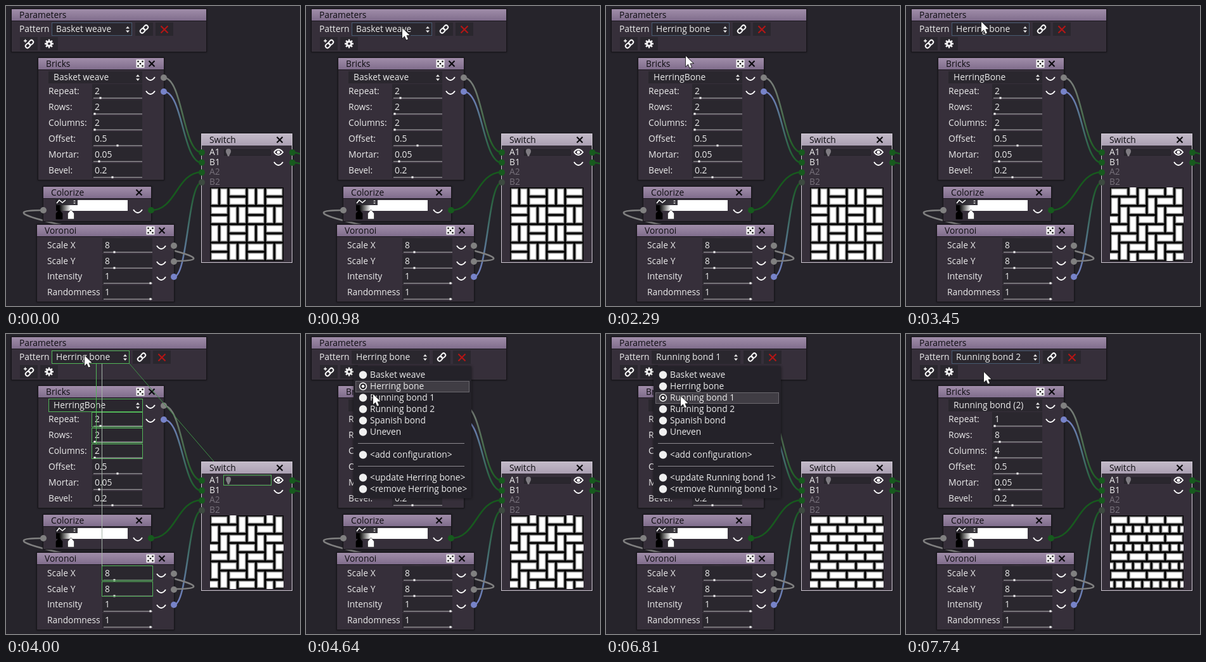
An HTML page with a canvas for the animation above (8 s loop, 464 by 473 pixels).

```html
<!DOCTYPE html>
<html lang="en">
<head>
<meta charset="utf-8">
<title>Node graph parameters</title>
<style>
html, body { margin: 0; width: 100%; height: 100%; overflow: hidden; background: #26242b; }
canvas { display: block; }
</style>
</head>
<body>
<canvas id="stage" width="464" height="473"></canvas>
<script>
const ctx = document.getElementById('stage').getContext('2d');
const LOOP = 8000;
const GREY = '#808080', BLUE = '#7783c9', GREEN = '#175a1e';
const WHITE = '#ececec', FIELD = '#2a272e', LINK = '#52b558';

const presets = [
  { name: 'Basket weave', mode: 'Basket weave', values: [2, 2, 2], grabs: [149, 140, 140], combo: 199, menu: 265 },
  { name: 'Herring bone', mode: 'HerringBone', values: [2, 2, 2], grabs: [149, 140, 140], combo: 195, menu: 261 },
  { name: 'Running bond 1', mode: 'Running bond', values: [1, 8, 4], grabs: [140, 148, 142], combo: 212, menu: 276 },
  { name: 'Running bond 2', mode: 'Running bond (2)', values: [1, 8, 4], grabs: [140, 148, 142], combo: 211, menu: 276 }
];
const menuNames = presets.map(p => p.name).concat('Spanish bond', 'Uneven');

// Pointer moves: first step, last step, step count, end point
const moves = [
  [380, 750, 6, 153, 37], [920, 1150, 4, 149, 28], [1290, 1460, 3, 142, 37],
  [1750, 1750, 1, 137, 57], [1830, 1980, 3, 126, 79], [3060, 3450, 6, 119, 25],
  [3680, 3680, 1, 118, 22], [3760, 3990, 4, 124, 34], [4070, 4470, 6, 110, 66],
  [4560, 4560, 1, 108, 84], [4640, 4640, 1, 106, 95], [4710, 4800, 2, 110, 101],
  [4950, 5340, 6, 131, 32], [6350, 6430, 2, 133, 19], [6500, 6500, 1, 130, 34],
  [6580, 6730, 3, 120, 92], [6810, 6810, 1, 118, 98], [6900, 6970, 2, 119, 116],
  [7350, 7740, 6, 123, 60]
];
const menuTimes = [[1290, 2210], [4150, 4880], [6580, 7280]];
const chosenAt = [2210, 4880, 7280], previewAt = [2670, 5030, 7510];

const countPassed = (times, t) => times.filter(s => t >= s).length;

function pointer(t) {
  let x = 376, y = 524;
  for (const [from, to, n, ex, ey] of moves) {
    if (t < from) break;
    const step = to > from ? Math.floor((t - from) / (to - from) * (n - 1) + 0.001) + 1 : n;
    const k = Math.min(step, n) / n;
    x += (ex - x) * k;
    y += (ey - y) * k;
  }
  return { x, y };
}

function text(s, x, y, color = WHITE) {
  ctx.font = '13.8px "Open Sans", "Noto Sans", sans-serif';
  ctx.fillStyle = color;
  ctx.fillText(s, x, y);
}

function rect(x1, y1, x2, y2, color) {
  ctx.fillStyle = color;
  ctx.fillRect(x1, y1, x2 - x1, y2 - y1);
}

function frame(x1, y1, x2, y2, color) {
  ctx.strokeStyle = color;
  ctx.lineWidth = 1;
  ctx.strokeRect(x1 + 0.5, y1 + 0.5, x2 - x1 - 1, y2 - y1 - 1);
}

function disc(x, y, r, color) {
  ctx.fillStyle = color;
  ctx.beginPath();
  ctx.arc(x, y, r, 0, Math.PI * 2);
  ctx.fill();
}

function path(points, color, width) {
  ctx.strokeStyle = color;
  ctx.lineWidth = width;
  ctx.beginPath();
  points.forEach(([x, y]) => ctx.lineTo(x, y));
  ctx.stroke();
}

function poly(points, color) {
  ctx.fillStyle = color;
  ctx.beginPath();
  points.forEach(([x, y]) => ctx.lineTo(x, y));
  ctx.closePath();
  ctx.fill();
}

function cross(x, y, color, r = 4.5) {
  path([[x - r, y - r], [x + r, y + r]], color, 2.2);
  path([[x + r, y - r], [x - r, y + r]], color, 2.2);
}

function dice(x, y) {
  rect(x - 6.5, y - 6.5, x + 6.5, y + 6.5, '#f4f4f4');
  for (const [dx, dy] of [[-3.5, -3.5], [3.5, -3.5], [0, 0], [-3.5, 3.5], [3.5, 3.5]])
    disc(x + dx, y + dy, 1.3, '#111');
}

function arrows(x, y, s = 1) {
  poly([[x - 3 * s, y - 1.5 * s], [x + 3 * s, y - 1.5 * s], [x, y - 5 * s]], WHITE);
  poly([[x - 3 * s, y + 1.5 * s], [x + 3 * s, y + 1.5 * s], [x, y + 5 * s]], WHITE);
}

function closedEye(x, y) {
  ctx.strokeStyle = '#fff';
  ctx.lineWidth = 2;
  ctx.beginPath();
  ctx.moveTo(x - 7, y - 1);
  ctx.quadraticCurveTo(x, y + 9, x + 7, y - 1);
  ctx.stroke();
}

function openEye(x, y) {
  ctx.strokeStyle = '#fff';
  ctx.lineWidth = 2;
  ctx.beginPath();
  ctx.moveTo(x - 7, y);
  ctx.quadraticCurveTo(x, y - 9, x + 7, y);
  ctx.quadraticCurveTo(x, y + 9, x - 7, y);
  ctx.stroke();
  disc(x, y, 2.5, '#fff');
}

function chain(x, y) {
  ctx.save();
  ctx.translate(x, y);
  ctx.rotate(-Math.PI / 4);
  ctx.strokeStyle = '#f2f2f2';
  ctx.lineWidth = 2;
  for (const dx of [-7.5, -0.5]) {
    ctx.beginPath();
    ctx.roundRect(dx, -3, 8, 6, 3);
    ctx.stroke();
  }
  ctx.restore();
}

function gear(x, y) {
  for (let i = 0; i < 4; i++) {
    const a = i * Math.PI / 4, c = Math.cos(a) * 7, s = Math.sin(a) * 7;
    path([[x - c, y - s], [x + c, y + s]], '#f2f2f2', 2.4);
  }
  disc(x, y, 5, '#f2f2f2');
  disc(x, y, 2, FIELD);
}

function wire(x1, y1, x2, y2, from, to) {
  const diff = x2 - x1;
  const d = diff > 0 ? Math.min(80, diff / 2) : Math.max(Math.min(80 - diff, 162), -diff / 2);
  const g = ctx.createLinearGradient(x1, y1, x2, y2);
  g.addColorStop(0, from);
  g.addColorStop(1, to);
  ctx.strokeStyle = g;
  ctx.lineWidth = 2.6;
  ctx.beginPath();
  ctx.moveTo(x1, y1);
  ctx.bezierCurveTo(x1 + d, y1, x2 - d, y2, x2, y2);
  ctx.stroke();
}

function panel(title, x1, y1, x2, y2, selected) {
  ctx.save();
  ctx.shadowColor = 'rgba(0,0,0,.5)';
  ctx.shadowBlur = 3;
  rect(x1, y1, x2, y2, 'rgba(57,50,61,.92)');
  ctx.restore();
  const g = ctx.createLinearGradient(0, y1, 0, y1 + 19);
  g.addColorStop(0, selected ? '#c4bbc9' : '#a28fab');
  g.addColorStop(1, selected ? '#aca0b3' : '#806d8c');
  rect(x1 + 1, y1 + 1, x2 - 1, y1 + 19, g);
  frame(x1, y1, x2, y2, selected ? '#d0c8d4' : '#17151a');
  if (!selected) path([[x1 + 1, y1 + 19.5], [x2 - 1, y1 + 19.5]], '#1c1920', 1);
  text(title, x1 + 13, y1 + 15, '#0d0c10');
}

function spin(x, y, value, grab) {
  rect(x, y - 11, x + 79, y + 12, FIELD);
  text(String(value), x + 4, y + 5);
  rect(x + 2, y + 10.5, x + 79, y + 12, '#8c8a8e');
  rect(grab - 1.5, y + 9.5, grab + 1.5, y + 12.5, '#fff');
}

function brick(x, y, w, h) {
  for (let j = 0; j <= 6; j++) {
    const inset = 0.6 + j * 0.45, v = Math.round(255 * j / 6);
    rect(x + inset, y + inset, x + w - inset, y + h - inset, `rgb(${v},${v},${v})`);
  }
}

function preview(kind) {
  const size = 116, u = size / 8;
  ctx.save();
  ctx.translate(322, 286);
  ctx.beginPath();
  ctx.rect(0, 0, size, size);
  ctx.clip();
  rect(0, 0, size, size, '#000');
  const put = (x, y, w, h) => brick(x * u, y * u, w * u, h * u);
  if (kind === 0) {
    for (let i = 0; i < 16; i++) {
      const cx = i % 4, cy = i >> 2, upright = (cx + cy) % 2 === 0;
      for (let k = 0; k < 2; k++)
        upright ? put(cx * 2 + k, cy * 2, 1, 2) : put(cx * 2, cy * 2 + k, 2, 1);
    }
  } else if (kind === 1) {
    for (let y = -1; y < 8; y++)
      for (let x = -1; x < 8; x++) {
        const side = (x - y + 16) % 4;
        if (side === 0) put(x, y, 2, 1);
        if (side === 3) put(x, y, 1, 2);
      }
  } else {
    for (let y = 0; y < 8; y++) {
      const odd = y % 2, w = odd && kind === 3 ? 1 : 2;
      for (let x = odd ? -w / 2 : 0; x < 8; x += w) put(x, y, w, 1);
    }
  }
  ctx.restore();
}

function drawParameters(p, focus) {
  panel('Parameters', 8, 4, 317, 73);
  text('Pattern', 21, 41);
  rect(72, 26, p.combo, 47, FIELD);
  if (focus) frame(72, 26, p.combo, 47, '#465a70');
  text(p.name, 79, 41);
  arrows(p.combo - 7, 37);
  const bx = p.combo + 5;
  for (const x of [bx, bx + 32]) rect(x, 26, x + 28, 47, FIELD);
  chain(bx + 14, 36.5);
  cross(bx + 46, 37, '#b31616', 5.5);
  rect(22, 49, 50, 70, FIELD);
  rect(54, 49, 82, 70, FIELD);
  chain(37, 60);
  path([[28, 55], [33, 55]], '#f2f2f2', 1.6);
  path([[30.5, 52.5], [30.5, 57.5]], '#f2f2f2', 1.6);
  gear(68, 59.5);
}

function drawBricks(p) {
  panel('Bricks', 50, 81, 250, 275);
  dice(212, 91);
  cross(230, 91, '#0d0c10');
  rect(67, 103, 215, 122, FIELD);
  text(p.mode, 75, 117);
  arrows(208, 113);
  const values = p.values.concat('0.5', '0.05', '0.2');
  const grabs = p.grabs.concat(176, 147, 168);
  ['Repeat:', 'Rows:', 'Columns:', 'Offset:', 'Mortar:', 'Bevel:'].forEach((label, i) => {
    text(label, 67, 139 + i * 25);
    spin(136, 134 + i * 25, values[i], grabs[i]);
  });
  closedEye(228, 113);
  closedEye(228, 135);
  disc(249, 113, 5, GREY);
  disc(249, 135, 5, BLUE);
}

function marker(x, fill, edge) {
  const shape = [[x - 5, 336], [x - 5, 327], [x, 321], [x + 5, 327], [x + 5, 336]];
  poly(shape, fill);
  path(shape.concat([shape[0]]), edge, 0.7);
}

function drawColorize() {
  panel('Colorize', 58, 284, 230, 340);
  cross(210, 294, '#0d0c10');
  const g = ctx.createLinearGradient(84, 0, 102, 0);
  g.addColorStop(0, '#000');
  g.addColorStop(1, '#fff');
  rect(79, 306, 192, 323, g);
  rect(78, 303, 113, 314, 'rgba(42,39,46,.92)');
  path([[80, 311], [84, 306], [89, 310], [94, 306]], '#fff', 1.6);
  arrows(108, 309, 0.6);
  marker(84, '#000', '#000');
  marker(102.5, '#fff', '#333');
  closedEye(208, 322);
  disc(59, 322, 5, GREY);
  disc(229, 322, 5, GREEN);
}

function drawVoronoi() {
  panel('Voronoi', 48, 344, 266, 467);
  dice(228, 354);
  cross(246, 354, '#0d0c10');
  const rows = [['Scale X', 8, 171], ['Scale Y', 8, 171], ['Intensity', 1, 228], ['Randomness', 1, 228]];
  rows.forEach(([label, value, grab], i) => {
    const y = Math.round(377 + i * 24.6);
    text(label, 65, y + 5);
    spin(152, y, value, grab);
    if (i < 3) {
      closedEye(245, y + 2);
      disc(265, y + 1, 5, i < 2 ? GREY : BLUE);
    }
  });
}

function drawSwitch(kind) {
  panel('Switch', 308, 201, 452, 405, true);
  cross(432, 211, '#0d0c10');
  ['A1', 'B1', 'A2', 'B2'].forEach((label, i) => {
    const y = 231 + i * 15.7;
    text(label, 321, Math.round(y + 4), i < 2 ? WHITE : '#77717b');
    disc(309, y, 5, i < 3 ? GREEN : '#3d4a40');
  });
  rect(344, 226, 418, 236, FIELD);
  frame(344, 226, 418, 236, '#242128');
  disc(351, 229, 4, '#807d83');
  poly([[347.5, 231], [354.5, 231], [352, 237], [350, 237]], '#807d83');
  openEye(430, 230.5);
  closedEye(430, 247);
  disc(452, 231, 5, GREEN);
  disc(452, 247, 5, GREEN);
  preview(kind);
}

function drawLinks(p) {
  const boxes = [
    [72, 26, p.combo, 47], [67, 102, 216, 123], [135, 123, 216, 147], [135, 148, 216, 172],
    [135, 173, 216, 197], [151, 365, 232, 389], [151, 390, 232, 414], [343, 222, 419, 239]
  ];
  boxes.forEach(b => frame(...b, LINK));
  path([[142.5, 47], [142.5, 173]], LINK, 1);
  path([[151.5, 47], [151.5, 366]], '#a5b3a8', 1);
  path([[p.combo, 47], [328, 201]], '#3f9147', 1);
}

function drawMenu(index, row) {
  const p = presets[index], right = p.menu;
  ctx.save();
  ctx.shadowColor = 'rgba(0,0,0,.55)';
  ctx.shadowBlur = 5;
  rect(75, 51, right, 259, '#242229');
  ctx.restore();
  if (row >= 0 && row < 6) {
    const y = 73 + (row - 1) * 18;
    rect(78, y + 1, right - 3, y + 19, '#403d44');
    frame(78, y + 1, right - 3, y + 19, '#6b686e');
  }
  const item = (label, y) => {
    disc(90, y + 0.5, 6.2, '#f0f0f0');
    text(label, 101, y + 5);
  };
  menuNames.forEach((name, i) => item(name, 64 + i * 18));
  disc(90, 64.5 + index * 18, 4.5, '#1b191e');
  disc(90, 64.5 + index * 18, 2.4, '#f0f0f0');
  item('<add configuration>', 190);
  item(`<update ${p.name}>`, 226);
  item(`<remove ${p.name}>`, 244);
  for (const y of [172.5, 208.5]) path([[82, y], [right - 11, y]], '#8d8a90', 1);
}

function drawPointer({ x, y }) {
  const shape = [[0, 0], [0, 16], [3.7, 12.6], [6.2, 18.6], [9, 17.4], [6.5, 11.6], [11.4, 11.3]]
    .map(([dx, dy]) => [x + dx, y + dy]);
  path(shape.concat([shape[0]]), '#1a1a1a', 1.6);
  poly(shape, '#fff');
}

function draw(t) {
  const index = countPassed(chosenAt, t), p = presets[index];
  const open = menuTimes.some(([a, b]) => t >= a && t < b);
  const at = pointer(t);
  const linked = t > 3000 && !open && at.y >= 26 && at.y < 47;

  rect(0, 0, 464, 473, '#26242b');
  wire(249, 113, 309, 231, GREY, GREEN);
  wire(249, 135, 309, 247, BLUE, GREEN);
  wire(229, 322, 309, 262, GREEN, GREEN);
  wire(265, 427, 309, 278, BLUE, GREEN);
  wire(265, 402, 59, 322, GREY, GREY);
  wire(452, 231, 492, 244, GREEN, GREEN);
  wire(452, 247, 492, 255, GREEN, GREEN);

  drawParameters(p, !open && !linked);
  drawBricks(p);
  drawColorize();
  drawVoronoi();
  drawSwitch(countPassed(previewAt, t));
  if (linked) drawLinks(p);
  // The highlighted row trails the pointer by one step
  if (open) drawMenu(index, Math.floor((pointer(t - 80).y - 55) / 18));
  drawPointer(at);
}

function tick() {
  draw(performance.now() % LOOP);
  requestAnimationFrame(tick);
}
tick();
</script>
</body>
</html>
```
